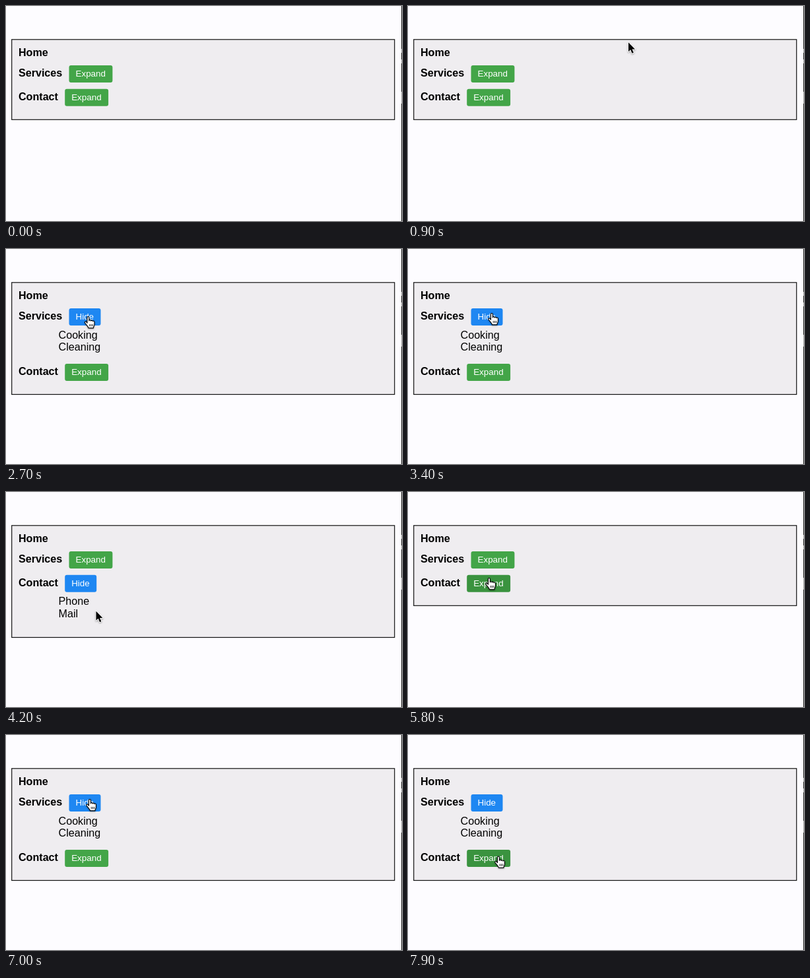
Animation of 600 by 326 pixels, one loop 8 s. Source, as an HTML page:

```html
<!DOCTYPE html>
<html lang="en">
<head>
<meta charset="utf-8">
<title>Expanding menu</title>
<style>
  html, body { margin: 0; width: 100%; height: 100%; overflow: hidden; background: #fdfcff; }
  svg { display: block; width: 600px; height: 326px; font: 16.1px "Liberation Sans", Arial, sans-serif; }
  .label { font-weight: bold; }
  .caption { font-size: 13.4px; fill: #fff; }
  #arrow { stroke: #fff; stroke-linejoin: round; paint-order: stroke; stroke-width: 2; }
  #hand { fill: #fff; stroke: #000; stroke-linejoin: round; }
  #cursor { filter: drop-shadow(0 1px 1px #0005); }
</style>
</head>
<body>
<svg viewBox="0 0 600 326">
  <path d="M599.5 0V326" stroke="#222"/>
  <path d="M599.5 65v6m0 10v6m0 43v18" stroke="#aaa"/>
  <rect id="panel" x="8.7" y="50.8" width="580" height="121.5" fill="#efedf0" stroke="#111" stroke-width="1.2"/>
  <text class="label" x="19" y="76.3">Home</text>
  <g id="menu"></g>
  <g id="cursor">
    <path id="arrow" d="M.5 .8V14.8L3.7 11.8 6 17.2 8.4 16.2 6.1 10.9H10.5Z"/>
    <g id="hand" transform="translate(-5 -1.4) scale(1.12)">
      <path d="M4 9.5V2.3c0-2 2.6-2 2.6 0V6.6c.2-1.6 2.5-1.5 2.6.1.4-1.3 2.3-1 2.4.5.4-1 2.2-.7 2.2.9v3.4c0 1.6-1.2 2.5-1.4 4.8H5.8C5.5 14.4 3 12.3 1 9.3c-1-1.6 1-2.5 1.9-1.2Z"/>
      <path d="M7.4 11v3M9.4 11v3M11.4 11v3" stroke-width=".8"/>
    </g>
  </g>
</svg>
<script>
const LOOP = 8000, STEP = 100, HOVER_DELAY = 350;
const PANEL_HEIGHT = 121.5, LIST_HEIGHT = 48.2, BUTTON_HEIGHT = 26;
const GREEN = "#43a548", GREEN_HOVER = "#3a933f", BLUE = "#1e87f2";
const byId = id => document.getElementById(id);
const show = (node, visible) => node.style.display = visible ? "" : "none";

function add(parent, tag, attributes, text = "") {
  const node = document.createElementNS("http://www.w3.org/2000/svg", tag);
  for (const name in attributes) node.setAttribute(name, attributes[name]);
  node.textContent = text;
  return parent.appendChild(node);
}

function makeEntry(label, top, buttonX, items) {
  const group = add(byId("menu"), "g", {});
  add(group, "text", { class: "label", x: 19, y: 17.2 }, label);
  const button = add(group, "rect", { x: buttonX, height: BUTTON_HEIGHT, rx: 3 });
  const caption = add(group, "text", { class: "caption", x: buttonX + 10, y: 17.3 });
  const list = add(group, "g", {});
  items.forEach((item, i) => add(list, "text", { x: 79.6, y: 45.6 + i * 18.5 }, item));
  return { top, group, button, caption, list };
}

const services = makeEntry("Services", 90, 95.5, ["Cooking", "Cleaning"]);
const contact = makeEntry("Contact", 125.7, 89.2, ["Phone", "Mail"]);

function openEntry(t) {
  if (t >= 6700) return services;
  if (t >= 5800) return null;
  if (t >= 4200) return contact;
  return t >= 2600 ? services : null;
}

const point = (x, y) => ({ x, y });
const entrance = point(479, 31), edge = point(479, 7), gap = point(130, 121);
const onServices = point(126, 98), onContact = point(122, 131);
const belowMail = point(136, 180), onLowContact = point(136, 184.5);
const move = (start, end, to) => ({ start, end, to });

// The pointer rests between moves.
const moves = [
  move(300, 400, edge),
  move(500, 1400, gap),
  move(1500, 2000, point(129.5, 101.5)),
  move(2000, 2400, point(123.5, 103)),
  move(2700, 3400, onServices),
  move(3400, 4000, belowMail),
  move(4500, 5000, onContact),
  move(5800, 6600, onServices),
  move(7200, 7600, onLowContact)
];

function ease(p) {
  p = Math.min(1, Math.max(0, p));
  return p * p * (3 - 2 * p);
}

function pointerAt(t) {
  return moves.reduce((from, { start, end, to }) => {
    const k = ease((t - start) / (end - start));
    return point(from.x + (to.x - from.x) * k, from.y + (to.y - from.y) * k);
  }, entrance);
}

function draw(t) {
  const open = openEntry(t);
  const { x, y } = pointerAt(t);
  const sensed = pointerAt(t - HOVER_DELAY);
  let hand = false;

  for (const entry of [services, contact]) {
    const expanded = entry === open;
    const top = entry.top + (entry === contact && open === services ? LIST_HEIGHT : 0);
    const hovered = sensed.x < 160 && sensed.y >= top && sensed.y < top + BUTTON_HEIGHT;
    hand ||= hovered;
    entry.group.setAttribute("transform", `translate(0 ${top})`);
    entry.button.setAttribute("width", expanded ? 48 : 65.9);
    entry.button.setAttribute("fill", expanded ? BLUE : hovered ? GREEN_HOVER : GREEN);
    entry.caption.textContent = expanded ? "Hide" : "Expand";
    show(entry.list, expanded);
  }

  byId("panel").setAttribute("height", PANEL_HEIGHT + (open ? LIST_HEIGHT : 0));
  byId("cursor").setAttribute("transform", `translate(${x} ${y})`);
  show(byId("cursor"), t >= moves[0].start);
  show(byId("arrow"), !hand);
  show(byId("hand"), hand);
}

const start = performance.now();
function tick() {
  const t = (performance.now() - start) % LOOP;
  draw(Math.floor(t / STEP) * STEP);
  requestAnimationFrame(tick);
}
tick();
</script>
</body>
</html>
```
